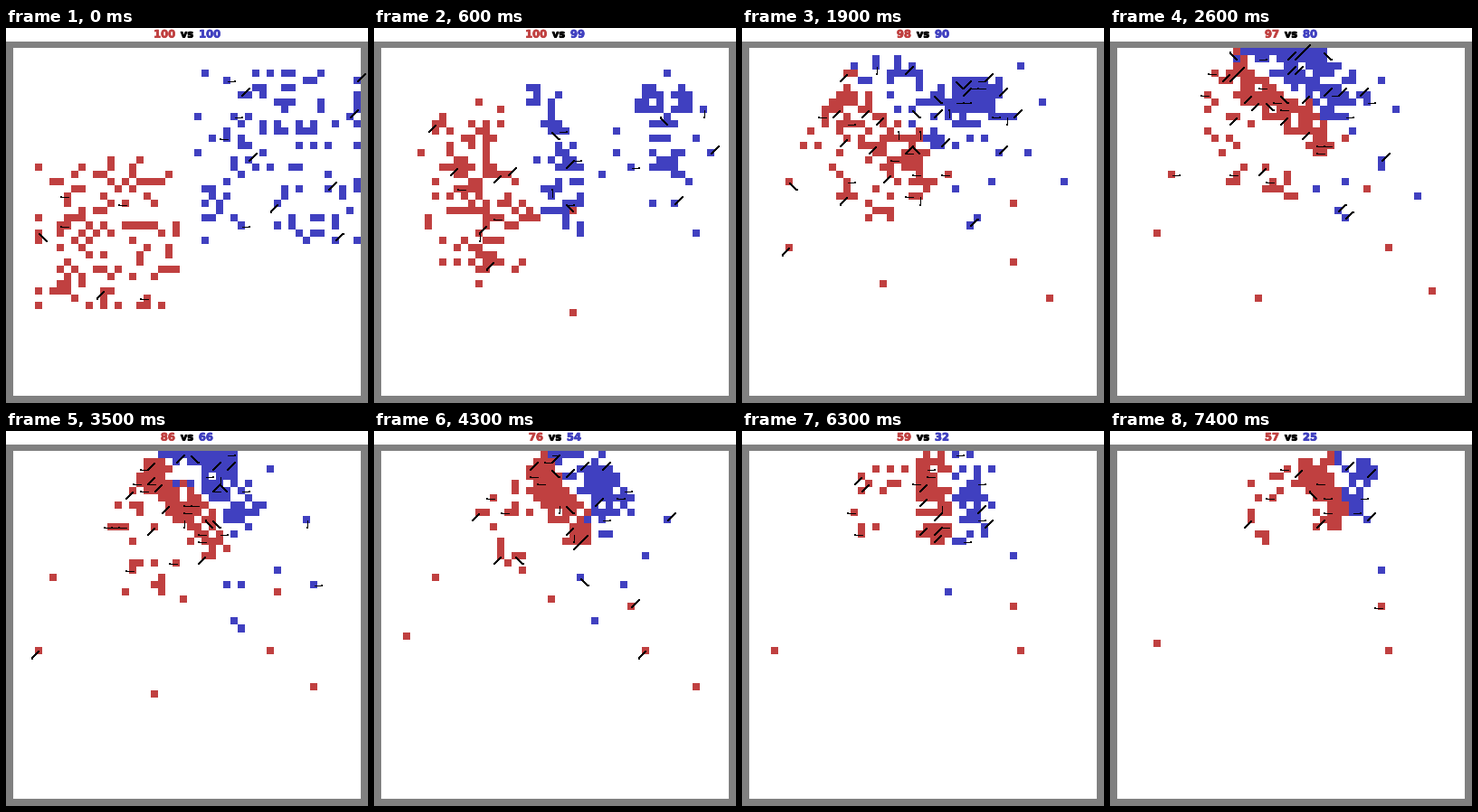
A matplotlib script that plays this animation: 400x415 px, repeating every 7500 ms.

```python
import matplotlib.pyplot as plt
import numpy as np
from matplotlib import colors, patheffects
from matplotlib.animation import FuncAnimation
from matplotlib.collections import LineCollection

W, H, CELL, N = 400, 415, 8, 48
LEFT, TOP = 8, 23
FRAMES, INTERVAL = 75, 100
RED, BLUE, GRAY = "#c04040", "#4040c0", "#808080"
DIGIT, GAP = 8, 26

rng = np.random.default_rng(4)
nearby = sorted(((x, y) for x in range(-6, 7) for y in range(-6, 7)),
                key=lambda d: d[0] ** 2 + d[1] ** 2)

# The battle line swings and climbs; each row is its two ends in cells.
line_times = [6, 15, 26, 43, 63, 74]
line_ends = np.array([(17, 5, 23, 27), (13, 4, 26, 19), (16, 0, 31, 11),
                      (23, 0, 30, 11), (27, 0, 28, 12), (29, 0, 32, 9)])
count_times = [0, 6, 15, 26, 43, 63, 74]


def battle_line(t):
    x1, y1, x2, y2 = (np.interp(t, line_times, e) for e in line_ends.T)
    along = np.array([x2 - x1, y2 - y1])
    normal = np.array([-along[1], along[0]]) / np.hypot(*along)
    return np.array([x1, y1]), along, normal


def box(n, x0, y0, x1, y1):
    """Pick n different cells of a box."""
    w, h = x1 - x0 + 1, y1 - y0 + 1
    k = rng.choice(w * h, n, replace=False)
    return np.column_stack([x0 + k % w, y0 + k // w]).astype(float)


def rank(v):
    return v.argsort().argsort() / len(v)


class Army:
    """Units march from home, some by way of a camp, to the battle line."""

    def __init__(self, home, side, counts, depth, stray_box, n_stray):
        n = len(home)
        self.home, self.side = home, side
        self.counts, self.depth = counts, depth
        self.camp = home.copy()
        self.leave, self.travel = np.zeros(n), np.full(n, 7.0)
        self.slot = rank(home[:, 1])
        self.share = rng.random(n)
        self.rear = np.zeros(n, bool)
        self.stray = np.zeros(n, bool)
        self.stray[rng.choice(n, n_stray, replace=False)] = True
        self.spot = box(n, *stray_box)
        self.travel[self.stray] = 15
        self.phase = rng.uniform(0, 2 * np.pi, (n, 2))
        self.rate = rng.uniform(0.3, 0.9, (n, 2))

    def spots(self, t):
        start, along, normal = battle_line(t)
        depth = 0.4 + self.share * np.interp(t, [6, 26, 74], self.depth)
        depth = np.where(self.rear, 4 + 10 * self.share, depth)
        goal = (start + self.slot[:, None] * along
                + self.side * depth[:, None] * normal)
        goal[self.stray] = self.spot[self.stray]
        base = self.home + (self.camp - self.home) * min(1, t / 15)
        k = np.clip((t - self.leave) / self.travel, 0, 1)[:, None]
        sway = np.where(self.stray, 1.5, 0.7)[:, None] * min(1, t / 6)
        pos = base + (goal - base) * k
        pos += sway * np.sin(self.phase + self.rate * t)
        alive = round(np.interp(t, count_times, self.counts))
        return np.clip(pos[:alive], 0, N - 1)


red = Army(box(100, 3, 15, 22, 35), 1, [100, 100, 98, 97, 76, 59, 57],
           [11, 4, 3], (2, 2, 42, 40), 8)
red.rear = ~red.stray & (rng.random(100) < 0.32)
red.travel[red.rear] = 10

blue = Army(box(100, 25, 3, 47, 26), -1, [100, 99, 95, 80, 54, 32, 25],
            [5, 6, 4], (28, 1, 44, 24), 10)
reserve = ~blue.stray & (rank(blue.home[:, 0]) > 0.5)
blue.camp[reserve] = rng.normal((34, 5), (3.2, 2), (reserve.sum(), 2))
blue.leave[reserve], blue.travel[reserve] = 15, 11
blue.slot[reserve] = 0.3 + 0.7 * blue.slot[reserve]


def settle(spots, used):
    """Snap positions to free cells."""
    out = []
    for x, y in np.rint(spots).astype(int):
        for dx, dy in nearby:
            c = (x + dx, y + dy)
            if c not in used and 0 <= c[0] < N and 0 <= c[1] < N:
                break
        used.add(c)
        out.append(c)
    return np.array(out)


turns = [(x, y) for x in (-1, 0, 1) for y in (-1, 0, 1) if x or y]


def swords(units, side, rate, rng):
    """Segments from some units to a neighbouring cell, mostly rearward."""
    segments = []
    for unit in units[rng.random(len(units)) < rate]:
        if rng.random() < 0.65:
            way = np.array([-side, side * rng.integers(2)])
        else:
            way = np.array(turns[rng.integers(len(turns))])
        mid = unit * CELL + [LEFT + 4.5, TOP + 4.5]
        segments.append((mid, mid + way * CELL))
    return segments


fig = plt.figure(figsize=(W / 100, H / 100), dpi=100, facecolor="white")
ax = fig.add_axes([0, 0, 1, 1])
ax.axis("off")
ax.add_patch(plt.Rectangle((0, 15), W, H - 15, fc=GRAY, lw=0, aa=False))
field = ax.imshow(np.ones((N, N, 3)), interpolation="nearest", aspect="auto",
                  extent=(LEFT, LEFT + N * CELL, TOP + N * CELL, TOP),
                  zorder=2)
blades = LineCollection([], colors="black", linewidths=0.5,
                        antialiaseds=False, zorder=3)
ax.add_collection(blades)
tips, = ax.plot([], [], "s", color="black", ms=2, mew=0, zorder=4)
ax.set(xlim=(0, W), ylim=(H, 0))


def label(color, text=""):
    bold = [patheffects.withStroke(linewidth=0.6, foreground=color)]
    return ax.text(W / 2, 10.5, text, color=color, ha="center", va="baseline",
                   family="DejaVu Sans", weight="bold", size=8.28,
                   path_effects=bold)


red_label, versus, blue_label = label(RED), label("black", "vs"), label(BLUE)


def draw(t):
    used = set()
    reds, blues = (settle(a.spots(t), used) for a in (red, blue))
    grid = np.ones((N, N, 3))
    for units, color in ((reds, RED), (blues, BLUE)):
        grid[units[:, 1], units[:, 0]] = colors.to_rgb(color)
    field.set_data(grid)

    dice = np.random.default_rng(t)
    heat = min(1, t / 20)
    arms = np.array(swords(reds, 1, 0.05 + 0.2 * heat, dice)
                    + swords(blues, -1, 0.1 + 0.12 * heat, dice))
    blades.set_segments(arms)
    tips.set_data(arms[:, 1, 0], arms[:, 1, 1])

    left, right = str(len(reds)), str(len(blues))
    wl, wr = DIGIT * len(left), DIGIT * len(right)
    x = (W - wl - GAP - wr) / 2
    red_label.set(text=left, x=x + wl / 2)
    versus.set_x(x + wl + GAP / 2)
    blue_label.set(text=right, x=x + wl + GAP + wr / 2)
    return field, blades, tips, red_label, versus, blue_label


anim = FuncAnimation(fig, draw, frames=FRAMES, interval=INTERVAL,
                     repeat=True, repeat_delay=0)
plt.show()
```
